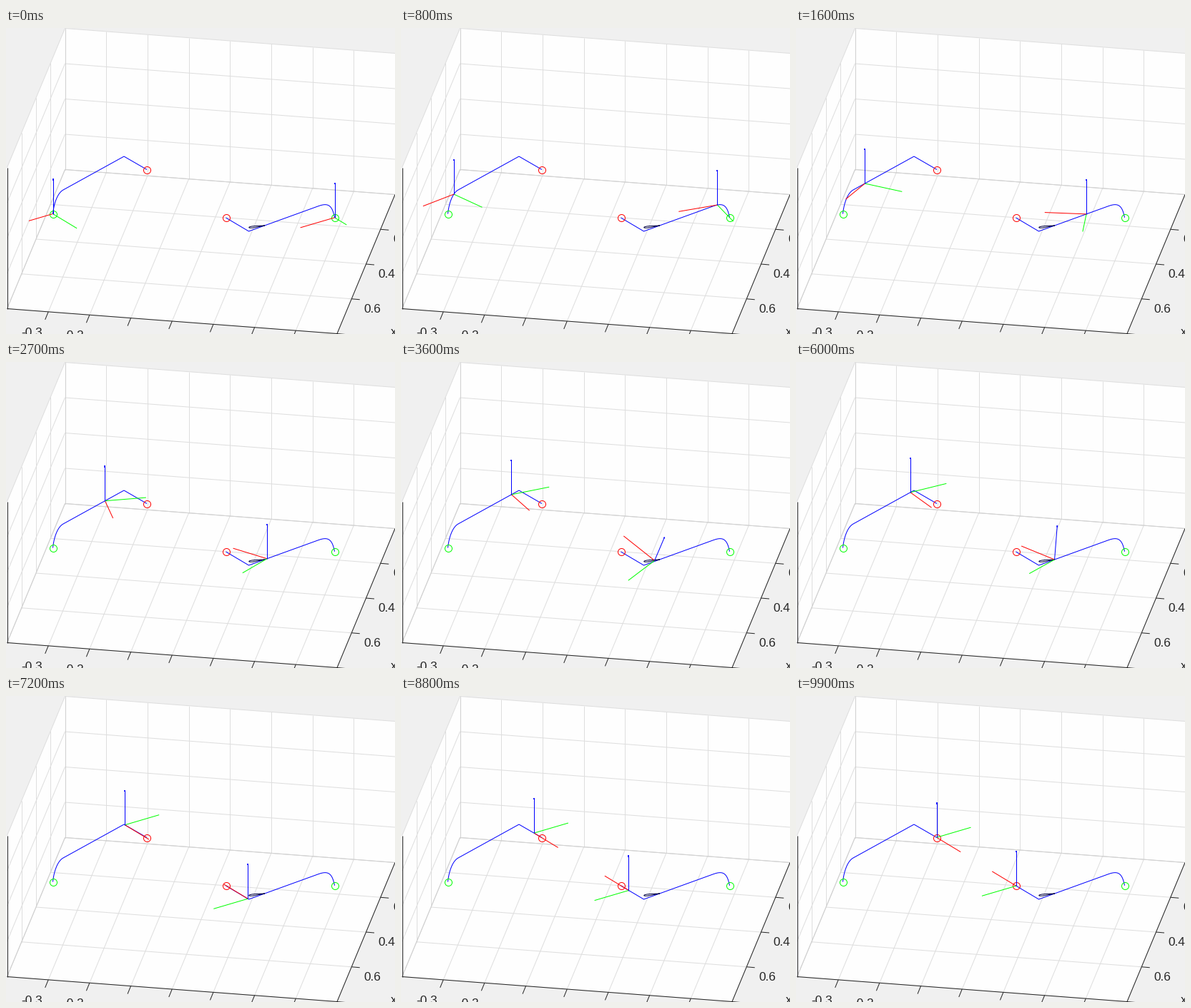
Write a matplotlib script that moves like this. It is 544x429 px and loops after 10000 ms.

```python
import numpy as np
import matplotlib.pyplot as plt
from matplotlib.animation import FuncAnimation

W, H, DPI = 544, 429, 64
PX = 72 / DPI
FRAMES, INTERVAL = 100, 100

# Screen offsets of one axis length along world x, y and z
EX, EY, EZ = np.array([-10.1, 24.35]), np.array([57.6, 4.4]), np.array([0, -49.2])

fig = plt.figure(figsize=(W / DPI, H / DPI), dpi=DPI, facecolor="#f0f0f0")
ax = fig.add_axes([0, 0, 1, 1])
ax.set_xlim(0, W)
ax.set_ylim(H, 0)
ax.axis("off")


def line(pts, color, width=1.0, z=2):
    x, y = np.transpose(pts)
    return ax.plot(x, y, color=color, lw=width * PX, zorder=z,
                   solid_capstyle="butt")[0]


def bezier(p0, p1, p2, p3, n=40):
    t = np.linspace(0, 1, n)[:, None]
    p0, p1, p2, p3 = map(np.array, (p0, p1, p2, p3))
    return ((1 - t) ** 3 * p0 + 3 * t * (1 - t) ** 2 * p1
            + 3 * t ** 2 * (1 - t) * p2 + t ** 3 * p3)


def ramp(f, start, end):
    return min(max((f - start) / (end - start), 0), 1)


def smooth(u):
    return u * u * (3 - 2 * u)


# ---- axes box ----
BACK, DEPTH, SIDE, UP = map(np.array, ((82.5, 198.5), (-81, 195), (461.5, 35), (0, -198)))
GRID, EDGE, DARK = "#dedede", "#d2d2d2", "#262626"


def pane(o, a, b):
    ax.fill(*np.transpose([o, o + a, o + a + b, o + b]), color="#fefefe", lw=0, zorder=0)


def rules(o, along, across, n):
    for i in range(n + 1):
        p = o + along * i / n
        line([p, p + across], GRID if i else EDGE, z=1 if i else 1.1)


for a, b, na, nb in ((SIDE, UP, 8, 4), (DEPTH, UP, 4, 4), (SIDE, DEPTH, 8, 4)):
    pane(BACK, a, b)
    rules(BACK, a, b, na)
    rules(BACK, b, a, nb)

front, right = BACK + DEPTH, BACK + SIDE
line([front + UP, front], DARK)
line([front, front + SIDE], DARK)
line([right, right + DEPTH], DARK)
for i in range(1, 9):
    p = front + SIDE * i / 8
    line([p, p + (-4.5, 11)], DARK)
for i in range(1, 5):
    p = right + DEPTH * i / 4
    line([p, p + (11.5, 1)], DARK)


def label(x, y, s, ha="left"):
    ax.text(x, y, s, color=DARK, ha=ha, va="baseline", fontsize=17.2 * PX,
            family="Liberation Sans", clip_on=True)


for i in range(2):
    label(36.5 + 58 * i, 432 + 4.4 * i, f"-0.{3 - i}", "center")
for i in range(3):
    label(541 - 20.3 * i, 301 + 49 * i, f"0.{2 + 2 * i}")
label(538, 431, "x")

# ---- paths ----
L_TURN, L_END = np.array([165, 180]), np.array([197, 198.5])
R_TURN, R_END = np.array([339.5, 285]), np.array([307.5, 266])
l_path = np.vstack([bezier((65.5, 260.5), (67, 246), (72, 231.4), (80, 227)), L_TURN])
r_path = np.vstack([bezier((459.5, 265.8), (456, 247), (449.5, 245), (436, 250)), R_TURN])


def detour(a):
    """Teardrop side trip of the right arm, a in 0..2 pi."""
    return np.array([350.8 + 11 * np.cos(a),
                     278.3 - 1.3 * np.cos(a) + 1.7 * np.sin(a) * np.sin(a / 2) ** 2])


line(np.vstack([l_path, L_END]), "blue", z=3)
line(np.vstack([r_path, R_END]), "blue", z=3)
line(detour(np.linspace(0, 2 * np.pi, 60)).T, "#000040", z=3)
for p, c in ((l_path[0], "lime"), (r_path[0], "lime"), (L_END, "red"), (R_END, "red")):
    ax.plot(*p, "o", ms=10 * PX, mfc="none", mec=c, mew=PX, zorder=4)

# ---- motion ----
L_HOLD, R_HOLD = .95, .81            # path share where each arm pauses
DETOUR, RESUME, TURN, STOP = 30, 61, 68, 101


def on_path(path, s):
    a, b = path[0, 0], path[-1, 0]
    x = a + (b - a) * s
    pts = path if a < b else path[::-1]
    return np.array([x, np.interp(x, pts[:, 0], pts[:, 1])])


def triad(yaw, pitch=0, roll=0):
    y, p, r = np.radians((yaw, pitch, roll))
    h = np.cos(y) * EX + np.sin(y) * EY
    g = -np.sin(y) * EX + np.cos(y) * EY
    up = -h * np.sin(p) + EZ * np.cos(p)
    return [h * np.cos(p) + EZ * np.sin(p),
            g * np.cos(r) - up * np.sin(r),
            up * np.cos(r) + g * np.sin(r)]


def clip(vec, room, reach):
    """Cut an axis where it leaves the box."""
    return vec * min(1, room / reach) if reach > 0 else vec


def last_leg(f, turn, end):
    return turn + (end - turn) * smooth(ramp(f, TURN, STOP))


def sigmoid(f, mid=19.66, width=5.82):
    s, s0 = (1 / (1 + np.exp((mid - t) / width)) for t in (f, 0))
    return (s - s0) / (1 - s0)


def left_pose(f):
    s = L_HOLD * sigmoid(f)
    s += (1 - s) * ramp(f, TURN - 2, TURN)
    pos = on_path(l_path, s) if f < TURN else last_leg(f, L_TURN, L_END)
    yaw = -45 + 90 * s
    axes = triad(yaw)
    axes[0] = clip(axes[0], .495 + (pos[0] - 65.5) / 57.6, -np.sin(np.radians(yaw)))
    return pos, axes


def right_pose(f):
    s = R_HOLD * smooth(ramp(f, 0, DETOUR)) + (1 - R_HOLD) * ramp(f, RESUME, TURN) ** 2
    a = 2 * np.pi * ramp(f, DETOUR, RESUME)
    if f >= TURN:
        pos = last_leg(f, R_TURN, R_END)
    elif DETOUR < f < RESUME:
        pos = detour(a)
    else:
        pos = on_path(r_path, s)
    lean = np.sin(a / 2)
    yaw = -45 - 90 * s + 6 * lean
    axes = triad(yaw, 46 * lean, 13 * max(np.sin(a), 0))
    axes[1] = clip(axes[1], .354 + (459.5 - pos[0]) / 57.6, np.cos(np.radians(yaw)))
    return pos, axes


def make_arm():
    nil = [(0, 0), (0, 0)]
    return [line(nil, c, 1, 5) for c in ("red", "lime", "blue")] + [line(nil, "blue", 1.7, 5)]


arms = [(left_pose, make_arm()), (right_pose, make_arm())]


def draw(f):
    for pose, parts in arms:
        pos, axes = pose(f)
        for part, v in zip(parts, axes):
            part.set_data(*np.transpose([pos, pos + v]))
        tip = pos + axes[2]
        parts[3].set_data(*np.transpose([tip - axes[2] * .05, tip]))
    return [p for _, parts in arms for p in parts]


anim = FuncAnimation(fig, draw, frames=FRAMES, interval=INTERVAL,
                     repeat=True, repeat_delay=0)
plt.show()
```
